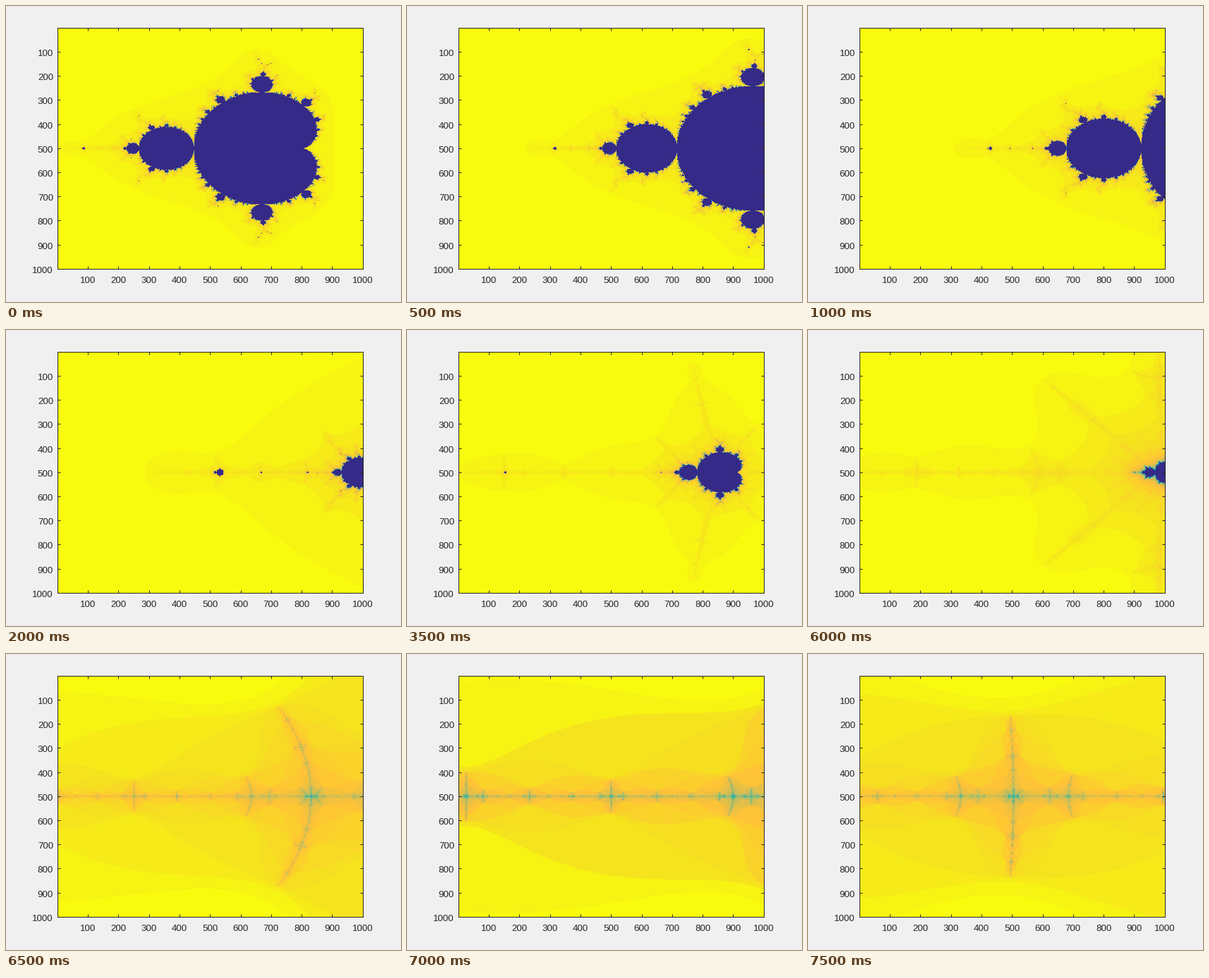
These frames come from a looping animation (560x420 px, 8000 ms). A matplotlib script:

```python
import numpy as np
import matplotlib.pyplot as plt
from matplotlib.animation import FuncAnimation
from matplotlib.colors import LinearSegmentedColormap

W, H, DPI = 560, 420, 100
LEFT, RIGHT, TOP, BOTTOM = 73, 506, 31, 373
INK = "#262626"
FRAMES, INTERVAL = 16, 500
GRID, MAX_ITER, SHADES = 1000, 250, 64

STOPS = [(0, "#352a87"), (8, "#0363e1"), (20, "#0998d1"), (32, "#38b99e"),
         (45, "#c0bc60"), (54, "#ffc337"), (60, "#f5e41d"), (63, "#f9fb0e")]
cmap = LinearSegmentedColormap.from_list(
    "depth", [(s / (SHADES - 1), colour) for s, colour in STOPS], N=SHADES)
LUT = cmap(np.arange(SHADES)[::-1], bytes=True)[:, :3]


def nucleus(c, period):
    """Newton search for the real c whose critical orbit has this period."""
    for _ in range(12):
        z, dz = 0.0, 0.0
        for _ in range(period):
            z, dz = z * z + c, 2 * z * dz + 1
        c -= z / dz
    return c


# The end point lies just beside a tiny copy of the set
START, SPAN = -0.6, 2.8
TARGET = nucleus(-1.8103935, 24) - 4.07e-8
LIFT = 4e-9


def view(k):
    """Centre and width: the zoom speeds up by 0.9 with every step."""
    shrink = 0.9 ** (k * (k + 1) / 2)
    return TARGET + (START - TARGET) * 0.473 ** k * shrink, SPAN * shrink


def in_main_bulbs(c):
    x, y2 = c.real, c.imag ** 2
    q = (x - 0.25) ** 2 + y2
    return (q * (q + x - 0.25) < y2 / 4) | ((x + 1) ** 2 + y2 < 1 / 16)


def escape_bins(k):
    centre, width = view(k)
    axis = np.linspace(-width / 2, width / 2, GRID)
    c = (centre + axis[None, :] + 1j * (axis[:, None] + LIFT)).ravel()
    count = np.full(c.size, MAX_ITER)
    alive = np.flatnonzero(~in_main_bulbs(c))
    c = c[alive]
    z = np.zeros_like(c)
    for n in range(1, MAX_ITER):
        z *= z
        z += c
        inside = z.real ** 2 + z.imag ** 2 <= 4
        if not inside.all():
            count[alive[~inside]] = n
            z, c, alive = z[inside], c[inside], alive[inside]
            if not alive.size:
                break
    low, high = count.min(), count.max()
    bins = np.minimum((count - low) * SHADES // (high - low), SHADES - 1)
    return bins.astype(np.uint8).reshape(GRID, GRID)


views = [escape_bins(k) for k in range(FRAMES)]

fig = plt.figure(figsize=(W / DPI, H / DPI), dpi=DPI, facecolor="#f0f0f0")
ax = fig.add_axes([LEFT / W, 1 - BOTTOM / H, (RIGHT - LEFT) / W, (BOTTOM - TOP) / H])
image = ax.imshow(LUT[views[0]], extent=(0.5, GRID + 0.5, GRID + 0.5, 0.5),
                  aspect="auto", interpolation="nearest")

px = 72 / DPI
ticks = np.arange(100, GRID + 1, 100)
ax.set_xticks(ticks)
ax.set_yticks(ticks)
ax.tick_params(direction="in", length=4.3 * px, width=px, color=INK,
               top=True, right=True, labelbottom=False, labelleft=False)
for spine in ax.spines.values():
    spine.set(linewidth=px, edgecolor=INK)


def label(x, y, value, align):
    fig.text(x / W, 1 - y / H, str(value), ha=align, va="baseline",
             family="Liberation Sans", size=13.33 * px, color=INK)


for t in ticks:
    part = (t - 0.5) / GRID
    label(LEFT + part * (RIGHT - LEFT), 393, t, "center")
    label(67, TOP + part * (BOTTOM - TOP) + 6, t, "right")


def update(k):
    image.set_data(LUT[views[k]])
    return (image,)


anim = FuncAnimation(fig, update, frames=FRAMES, interval=INTERVAL, repeat=True)
plt.show()
```
